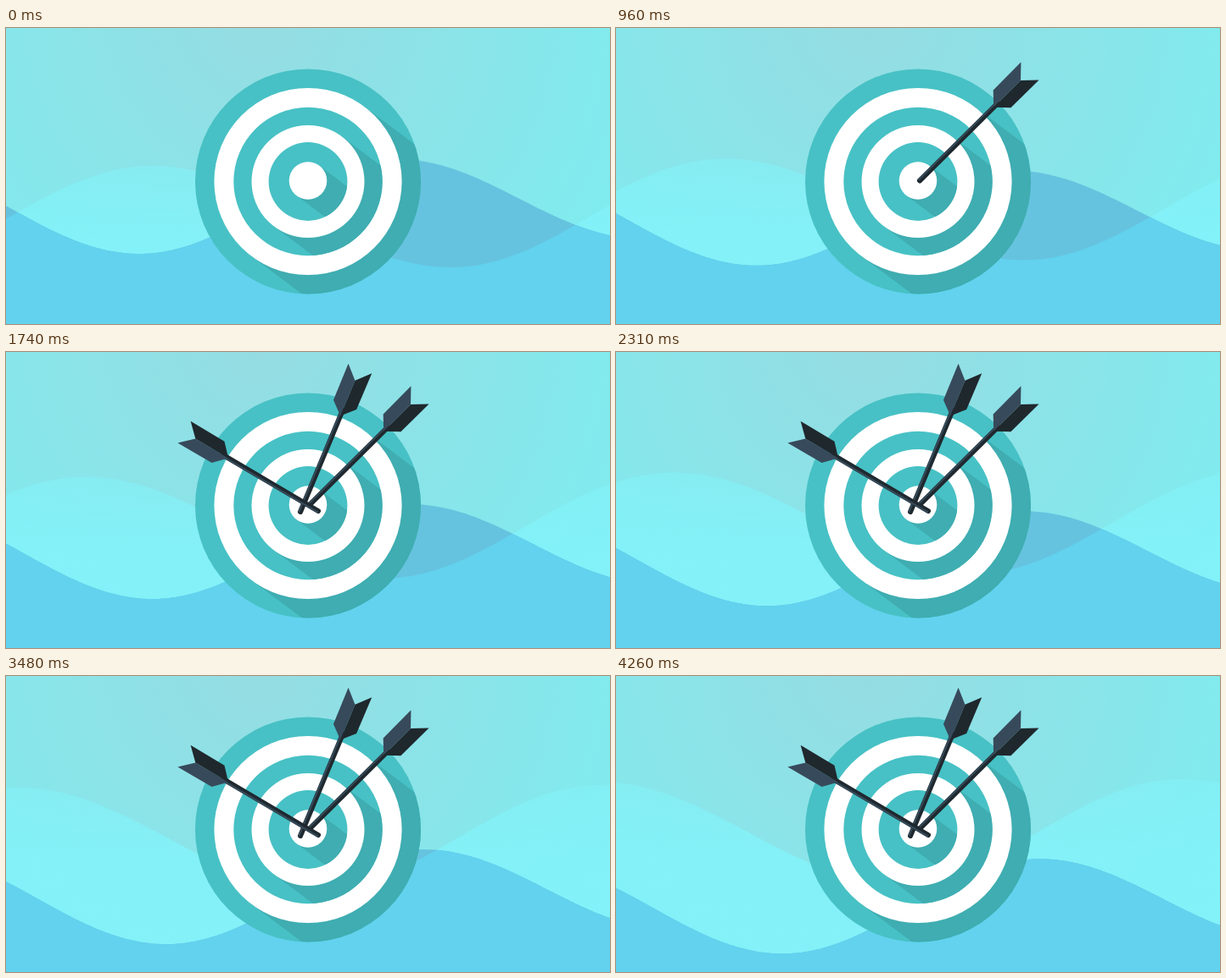
Animation, 712 px wide and 350 px high, one loop 4290 ms. Source, as an HTML page with a canvas:

```html
<!DOCTYPE html>
<html lang="en">
<head>
<meta charset="utf-8">
<title>Arrows on a bullseye</title>
<style>
  html, body { margin: 0; width: 100%; height: 100%; overflow: hidden; background: #86e5ea; }
  canvas { display: block; }
</style>
</head>
<body>
<canvas id="stage" width="712" height="350"></canvas>
<script>
const W = 712, H = 350, LOOP = 4290, TICK = 30;
const ctx = document.getElementById('stage').getContext('2d');

const CX = 356, CY = 181.5;
const TEAL = '#47c1c5', SHADE = '#3fadb1';

// Crests and troughs at time zero, and drift in px per second.
const paleWave = {
  nodes: [[-163, 283], [172, 163], [525, 283], [857, 160], [1257, 283]],
  vx: -45.1, vy: -8.9
};
const blueWave = {
  nodes: [[-147, 159], [157, 267], [461, 155], [750, 249], [1050, 160]],
  vx: 9.15, vy: 14.4
};

// Tip position, a point on the axis behind the tail, landing time.
const arrows = [
  { tip: [358, 180.5], tail: [488.5, 50.5], land: 705 },
  { tip: [347, 189], tail: [417, 20.5], land: 1332 },
  { tip: [368, 188], tail: [210.5, 95], land: 1610 }
];
const SPEED = 2.45;

function height(nodes, x) {
  let i = 0;
  while (i < nodes.length - 2 && x > nodes[i + 1][0]) i++;
  const [x0, y0] = nodes[i], [x1, y1] = nodes[i + 1];
  const k = (x - x0) / (x1 - x0);
  return y0 + (y1 - y0) * (1 - Math.cos(k * Math.PI)) / 2;
}

function wavePath(wave, t) {
  const dx = wave.vx * t / 1000, dy = wave.vy * t / 1000;
  const path = new Path2D();
  path.moveTo(-4, H + 4);
  for (let x = -4; x <= W + 4; x += 3) path.lineTo(x, height(wave.nodes, x - dx) + dy);
  path.lineTo(W + 4, H + 4);
  path.closePath();
  return path;
}

function drawSky() {
  const g = ctx.createRadialGradient(300, -10, 0, 300, -10, 480);
  g.addColorStop(0, '#95dce2');
  g.addColorStop(1, '#7fecef');
  ctx.fillStyle = g;
  ctx.fillRect(0, 0, W, H);
}

function drawWaves(t) {
  const pale = wavePath(paleWave, t), blue = wavePath(blueWave, t);
  const top = 160 + paleWave.vy * t / 1000;
  const g = ctx.createLinearGradient(0, top, 0, top + 90);
  g.addColorStop(0, 'rgba(131,243,250,.5)');
  g.addColorStop(1, 'rgba(131,243,250,.85)');
  ctx.fillStyle = g;
  ctx.fill(pale);

  ctx.fillStyle = '#66c3df';
  ctx.fill(blue);
  ctx.save();
  ctx.clip(pale);
  ctx.fillStyle = '#62d2ee';
  ctx.fill(blue);
  ctx.restore();
}

function disc(r, color, y = CY) {
  ctx.beginPath();
  ctx.arc(CX, y, r, 0, Math.PI * 2);
  ctx.fillStyle = color;
  ctx.fill();
}

// Teal disc, long shadow of the white disc on it, then the white disc.
function ring(outer, inner, y = CY) {
  disc(outer, TEAL);
  ctx.save();
  ctx.clip();
  ctx.translate(CX, y);
  ctx.rotate(Math.atan2(3, 4));
  ctx.fillStyle = SHADE;
  ctx.fillRect(0, -inner, 300, inner * 2);
  ctx.restore();
  disc(inner, '#fff', y);
}

function drawTarget() {
  ring(133, 110.6);
  ring(87.7, 66.5);
  ring(46.4, 22.3, 180.5);
}

function poly(color, points) {
  ctx.beginPath();
  for (const [x, y] of points) ctx.lineTo(x, y);
  ctx.closePath();
  ctx.fillStyle = color;
  ctx.fill();
}

function line(color, width, y, from, to) {
  ctx.beginPath();
  ctx.moveTo(from, y);
  ctx.lineTo(to, y);
  ctx.lineWidth = width;
  ctx.strokeStyle = color;
  ctx.stroke();
}

function drawArrow({ tip, tail, land }, t) {
  const gap = Math.max(0, land - t) * SPEED;
  ctx.save();
  ctx.translate(tip[0], tip[1]);
  ctx.rotate(Math.atan2(tail[1] - tip[1], tail[0] - tip[0]));
  ctx.translate(gap, 0);
  ctx.lineCap = 'round';
  line('#1f292f', 6, 0, 0, 130);
  line('#364b5b', 2, -1.6, 0, 130);
  const vane = s => [[123, 0], [137, 14.7 * s], [183.5, 15 * s], [168, 0]];
  poly('#374a5b', vane(-1));
  poly('#1f282d', vane(1));
  ctx.restore();
}

function frame(now) {
  const t = Math.floor(now % LOOP / TICK) * TICK;
  drawSky();
  drawWaves(t);
  drawTarget();
  for (const a of arrows) drawArrow(a, t);
}

const start = performance.now();
function tick() {
  frame(performance.now() - start);
  requestAnimationFrame(tick);
}
tick();
</script>
</body>
</html>
```
